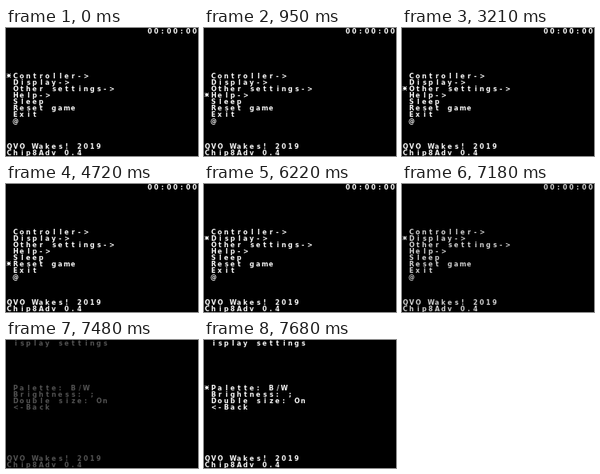
Animation, 240 px wide and 160 px high, one loop 8000 ms. Source, as an HTML page with a canvas:

```html
<!DOCTYPE html>
<html lang="en">
<head>
<meta charset="utf-8">
<title>Handheld settings menu</title>
<style>
  html, body { margin: 0; width: 100%; height: 100%; overflow: hidden; background: #000; }
  canvas { display: block; width: 240px; height: 160px; }
</style>
</head>
<body>
<canvas id="stage" width="240" height="160"></canvas>
<script>
const ctx = document.getElementById('stage').getContext('2d');
const LOOP = 8000, CELL = 8, BASELINE = 7, MENU_ROW = 7, WHITE = 248;
const FADE_START = 7180, FADE_STEP = 50, FADE_HALF = 5;

const mainMenu = ['Controller->', 'Display->', 'Other settings->', 'Help->',
                  'Sleep', 'Reset game', 'Exit', '@'];
const displayMenu = ['Palette: B/W', 'Brightness: ;', 'Double size: On', '<-Back'];

// Times at which the cursor steps one row down or up
const downs = [500, 800, 950, 1100, 1250, 3060, 3210, 3360, 3510, 3660, 3810, 5720, 5870];
const ups = [2000, 2100, 2300, 2460, 2610, 4720, 4870, 5020, 5220, 5370, 5470, 6220];
const countPast = (times, t) => times.filter(time => t >= time).length;

// One character per 8 px terminal cell, centred on whole pixels
function print(text, col, row) {
  [...text].forEach((ch, i) => {
    const inset = Math.round((CELL - ctx.measureText(ch).width) / 2);
    ctx.fillText(ch, (col + i) * CELL + inset, row * CELL + BASELINE);
  });
}

function drawCursor(row) {
  const y = (MENU_ROW + row) * CELL + 1;
  ctx.fillRect(1, y + 2, 5, 1);
  for (let i = 0; i < 5; i++) {
    ctx.fillRect(1 + i, y + i, 1, 1);
    ctx.fillRect(5 - i, y + i, 1, 1);
    ctx.fillRect(3, y + i, 1, 1);
  }
}

function drawMenu(items) {
  items.forEach((item, i) => print(item, 1, MENU_ROW + i));
  print('QVO Wakes! 2019', 0, 18);
  print('Chip8Adv 0.4', 0, 19);
}

function draw(t) {
  const step = Math.max(0, Math.floor((t - FADE_START) / FADE_STEP) + 1);
  const opened = step > FADE_HALF;
  const light = opened ? Math.min(1, (step - FADE_HALF) / 6) : 1 - step / 6;
  const grey = Math.round(WHITE * light);

  ctx.fillStyle = '#000';
  ctx.fillRect(0, 0, 240, 160);
  ctx.fillStyle = `rgb(${grey}, ${grey}, ${grey})`;
  ctx.font = 'bold 8px "DejaVu Sans", sans-serif';

  if (opened) {
    print('isplay settings', 1, 0);
    drawMenu(displayMenu);
    if (light === 1) drawCursor(0);
  } else {
    print('00:00:00', 22, 0);
    drawMenu(mainMenu);
    drawCursor(countPast(downs, t) - countPast(ups, t));
  }
}

const start = performance.now();
function tick() {
  draw((performance.now() - start) % LOOP);
  requestAnimationFrame(tick);
}
tick();
</script>
</body>
</html>
```
